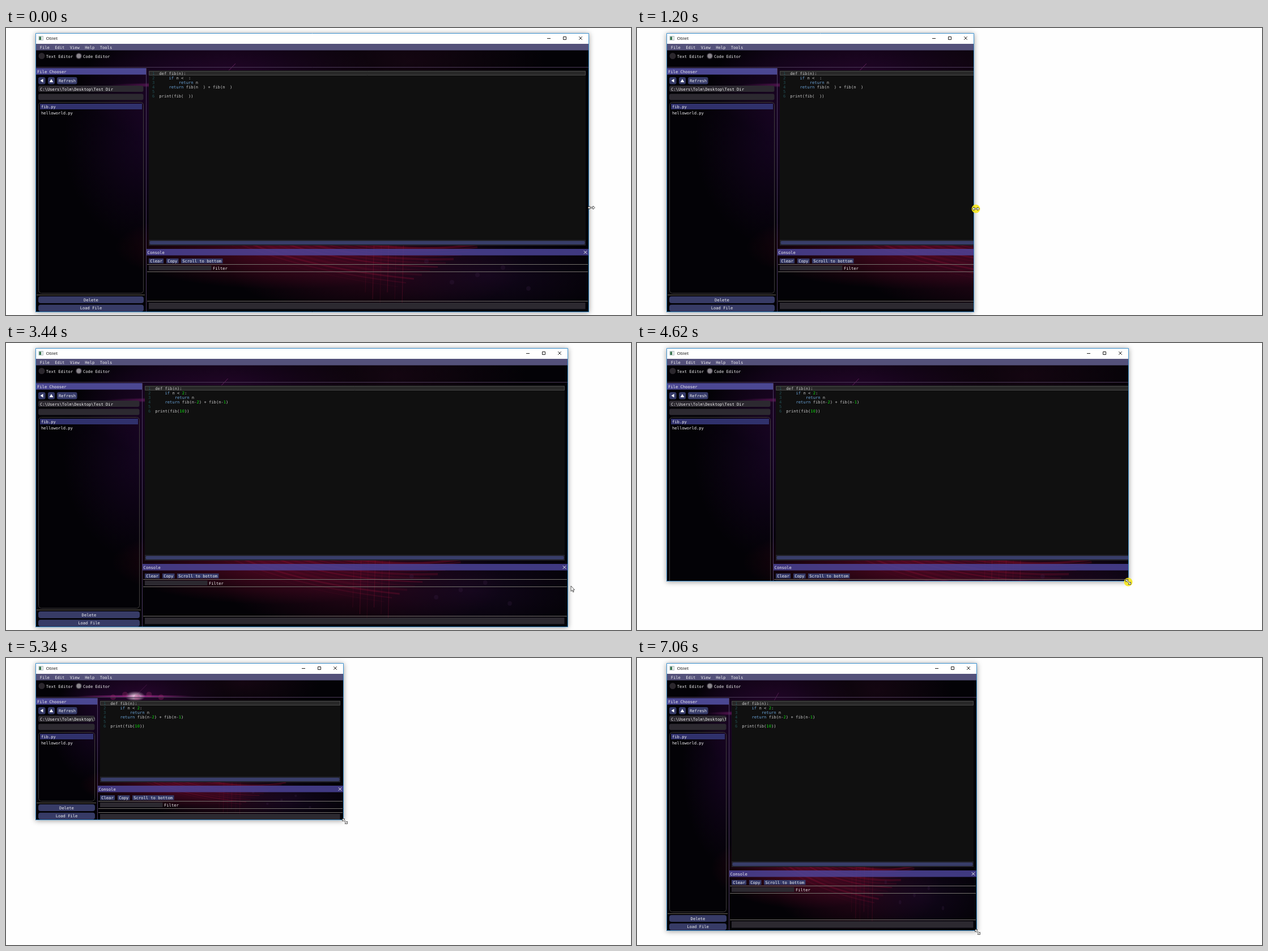
An HTML page with a canvas that plays this animation: 1103x508 px, repeating every 7.57 s.

```html
<!DOCTYPE html>
<html lang="en">
<head>
<meta charset="utf-8">
<title>Resizing an editor window</title>
<style>
  html, body { margin: 0; width: 100%; height: 100%; overflow: hidden; background: #fefefe; }
  canvas { display: block; width: 100vw; height: 100vh; }
</style>
</head>
<body>
<canvas id="stage" width="1103" height="508"></canvas>
<script>
const ctx = document.getElementById('stage').getContext('2d');
const LOOP = 7570, LEFT = 52, TOP = 9, STEP = 47;
const MONO = '7.15px "DejaVu Sans Mono", monospace';
const BUTTON = '#353a68', FIELD = '#2c2930', RULE = '#74716c';

// time, window right, window bottom, pointer x, pointer y
const poses = [
  [0, 1029, 503, 1033, 318],
  [432, 1029, 503, 1033, 318],
  [1200, 595, 503, 598, 320],
  [1380, 592, 503, 597, 320],
  [1840, 592, 503, 597, 320],
  [2310, 846, 503, 853, 320],
  [2590, 992, 503, 996, 320],
  [3100, 992, 503, 996, 320],
  [3440, 992, 503, 997, 430],
  [3860, 992, 503, 993, 503],
  [4183, 992, 503, 993, 503],
  [4620, 868, 422, 867, 423],
  [4970, 682, 328, 683, 330],
  [5250, 596, 287, 598, 289],
  [5940, 596, 287, 598, 289],
  [6740, 597, 470, 599, 472],
  [6880, 600, 483, 601, 485],
  [LOOP, 600, 483, 601, 485]
];

// time from which the content is laid out for this right and bottom edge
const layouts = [[0, 1029, 503], [1310, 592, 503], [2730, 992, 503], [5300, 596, 287], [7020, 600, 483]];
const presses = [[340, 1290], [1890, 2730], [4230, 5300], [5990, 7020]];

function poseAt(t) {
  const i = poses.findIndex(p => p[0] > t), a = poses[i - 1], b = poses[i];
  const steps = Math.max(1, Math.round((b[0] - a[0]) / STEP));
  const k = Math.floor((t - a[0]) / (b[0] - a[0]) * steps + 1e-6) / steps;
  return a.map((v, n) => v + (b[n] - v) * k).slice(1);
}

function box(x, y, right, bottom, fill, radius = 0) {
  ctx.fillStyle = fill;
  ctx.beginPath();
  ctx.roundRect(x, y, right - x, bottom - y, radius);
  ctx.fill();
}

function outline(x, y, right, bottom, color, radius = 0) {
  ctx.strokeStyle = color;
  ctx.lineWidth = 1;
  ctx.beginPath();
  ctx.roundRect(x, y, right - x, bottom - y, radius);
  ctx.stroke();
}

function poly(points, color, width = 1) {
  ctx.strokeStyle = color;
  ctx.lineWidth = width;
  ctx.beginPath();
  points.forEach(p => ctx.lineTo(...p));
  ctx.stroke();
}

function disc(x, y, r, fill) {
  ctx.fillStyle = fill;
  ctx.beginPath();
  ctx.arc(x, y, r, 0, 7);
  ctx.fill();
}

function text(s, x, middle, color = '#f0f0f0', align = 'left') {
  ctx.font = MONO;
  ctx.fillStyle = color;
  ctx.textAlign = align;
  ctx.fillText(s, x, middle + 2.5);
}

function cross(x, y, r, color) {
  poly([[x - r, y - r], [x + r, y + r]], color);
  poly([[x - r, y + r], [x + r, y - r]], color);
}

function clipped(x, y, right, bottom, draw) {
  ctx.save();
  ctx.beginPath();
  ctx.rect(x, y, right - x, bottom - y);
  ctx.clip();
  draw();
  ctx.restore();
}

function glow(x, y, rx, ry, rgb, alpha) {
  ctx.save();
  ctx.translate(x, y);
  ctx.scale(rx, ry);
  const g = ctx.createRadialGradient(0, 0, 0, 0, 0, 1);
  g.addColorStop(0, `rgba(${rgb},${alpha})`);
  g.addColorStop(1, `rgba(${rgb},0)`);
  ctx.fillStyle = g;
  ctx.fillRect(-1, -1, 2, 2);
  ctx.restore();
}

// Wallpaper, painted on 977 x 475 units and stretched with the layout
function wallpaper(right, bottom) {
  ctx.save();
  ctx.translate(LEFT, 28);
  ctx.scale((right - LEFT) / 977, (bottom - 28) / 475);
  ctx.fillStyle = '#030206';
  ctx.fillRect(0, 0, 977, 475);
  glow(340, 70, 260, 120, '75,10,85', 0.5);
  glow(200, 170, 150, 190, '38,6,58', 0.5);
  glow(660, 30, 240, 100, '40,10,30', 0.45);
  glow(440, 360, 300, 75, '120,10,45', 0.65);
  glow(600, 395, 260, 90, '85,10,45', 0.5);
  glow(800, 410, 230, 80, '30,10,45', 0.55);
  for (let i = 0; i < 12; i++) {
    ctx.strokeStyle = `rgba(${150 + i * 6},20,60,${0.1 + (i % 3) * 0.07})`;
    ctx.lineWidth = 1 + i % 4;
    ctx.beginPath();
    ctx.moveTo(300 + i * 18, 335);
    ctx.quadraticCurveTo(420 + i * 20, 400 - i * 2, 640 + i * 14, 430 - i * 7);
    ctx.stroke();
  }
  for (let i = 0; i < 6; i++)
    poly([[585 + i * 13, 330], [582 + i * 13, 440 + i % 3 * 12]], `rgba(190,30,70,${0.12 + i % 2 * 0.12})`);
  poly([[316, 73], [353, 35]], 'rgba(180,70,160,.45)');
  glow(316, 73, 190, 5, '225,60,190', 0.7);
  glow(316, 73, 32, 17, '255,225,245', 0.95);
  for (let i = 0; i < 5; i++)
    disc(246 + i * 38, 76 - i % 2 * 9, 9, 'rgba(160,40,110,.32)');
  for (let i = 0; i < 5; i++)
    disc(690 + i * 45, 385 + i * 37 % 50, 4, 'rgba(70,40,80,.22)');
  ctx.restore();
}

const code = ['def fib(n):', '    if n < 2:', '        return n', '    return fib(n-2) + fib(n-1)', '', 'print(fib(10))'];

function codeLine(line, x, y, digits) {
  const advance = 7.15 * 0.602;
  for (const { 0: word, index } of line.matchAll(/\w+|[^\w\s]+/g)) {
    const number = /^\d/.test(word);
    if (!digits && (number || word === '-')) continue;
    const color = number ? '#10e010' : /^(if|return)$/.test(word) ? '#6ba4d8' : '#c8c8c8';
    text(word, x + index * advance, y, color);
  }
}

function header(right) {
  box(LEFT, 28, right, 39.5, '#54517a');
  ['File', 'Edit', 'View', 'Help', 'Tools'].forEach((s, i) => text(s, 59.7 + i * 26.5, 34));
  disc(63, 49.5, 5.5, '#2b272d');
  disc(128.5, 49.5, 5.5, '#343038');
  disc(128.5, 49.5, 4, '#8b878d');
  text('Text Editor', 70.8, 50);
  text('Code Editor', 136, 50);
  poly([[LEFT, 69.5], [right, 69.5]], '#4a3856');
}

function sidebar(side, bottom) {
  box(LEFT, 71, side, 82.5, '#4b4792');
  text('File Chooser', 55, 77);
  box(57, 87, 69.5, 99.5, BUTTON, 3);
  box(74, 87, 86, 99.5, BUTTON, 3);
  box(90, 87, 125.5, 99.5, BUTTON, 3);
  ctx.fillStyle = '#fff';
  ctx.fill(new Path2D('M60.5 93.3l5-3.2v6.4zM80 90.3l3.4 5.7h-6.8z'));
  text('Refresh', 93, 93.5);
  box(57, 102, side - 4.5, 113, FIELD, 3);
  box(57, 116.5, side - 4.5, 127.5, FIELD, 3);
  clipped(57, 102, side - 4.5, 113, () => text(String.raw`C:\Users\Tolm\Desktop\Test Dir`, 60, 108));
  outline(57.5, 131.5, side - 4.5, bottom - 33.5, '#403d3c', 5);
  box(60, 134, side - 7, 144, '#30316c');
  text('fib.py', 62, 139.3);
  text('helloworld.py', 62, 150);
  poly([[54, bottom - 30.5], [side - 2, bottom - 30.5]], '#686254');
  ['Delete', 'Load File'].forEach((s, i) => {
    const y = bottom - 28 + i * 14.7;
    box(57, y, side - 4, y + 12, '#373b66', 4);
    text(s, (57 + side - 4) / 2, y + 6, '#f0f0f0', 'center');
  });
  poly([[side + 0.5, 71], [side + 0.5, bottom]], '#4b3a60');
}

function editor(side, right, end, digits) {
  const x = side + 5;
  box(x, 75, right - 6, end, '#101010');
  box(x, 76, right - 6, 83.5, '#282828');
  outline(x + 0.5, 76.5, right - 6.5, 83.5, '#484848');
  code.forEach((line, i) => {
    text(String(i + 1), side + 11, 80.3 + i * 8, '#245056');
    codeLine(line, side + 23.3, 80.3 + i * 8, digits);
  });
  box(x, end - 10, right - 6, end, '#22222b');
  box(x + 1.5, end - 8, right - 7.5, end - 2, '#383d69', 2);
}

function consolePane(side, right, top, bottom) {
  const rule = y => poly([[side + 2, y], [right - 2, y]], RULE);
  box(side + 1, top, right, top + 11.5, 'rgba(78,70,158,.8)');
  text('Console', side + 2.6, top + 6);
  cross(right - 6.5, top + 6, 2.7, '#f0f0f0');
  [['Clear', 5, 31], ['Copy', 36, 57.5], ['Scroll to bottom', 62, 135.5]].forEach(([s, a, b]) => {
    box(side + a, top + 17, side + b, top + 25.5, BUTTON);
    text(s, side + a + 2.2, top + 21.2);
  });
  rule(top + 27.5);
  box(side + 5, top + 29.5, side + 115.5, top + 38, FIELD);
  text('Filter', side + 118, top + 34);
  rule(top + 40.5);
  const last = Math.max(bottom - 19.5, top + 47.5);
  rule(last);
  box(side + 5, last + 2.5, right - 6.5, last + 14, FIELD);
}

function content(right, bottom, digits) {
  const side = Math.round(LEFT + 0.2 * (right - LEFT));
  const top = Math.round(bottom * 0.764 + 6.8);
  clipped(LEFT, 28, right, bottom, () => {
    wallpaper(right, bottom);
    header(right);
    sidebar(side, bottom);
    editor(side, right, top - 6, digits);
    consolePane(side, right, top, bottom);
    poly([[right - 0.5, 28], [right - 0.5, bottom]], '#4b3a60');
  });
}

function frame(right, bottom) {
  ctx.save();
  ctx.shadowColor = 'rgba(0,0,0,.4)';
  ctx.shadowBlur = 9;
  ctx.shadowOffsetY = 1;
  box(LEFT, TOP, right, bottom, '#000');
  ctx.restore();
  box(LEFT, TOP, right, 28, '#fff');
}

function titleBar(right) {
  box(57.5, 14, 66, 22, '#b8c5c8');
  box(58.5, 15.5, 62, 21, '#39764f');
  box(62, 15.5, 65, 21, '#e8ecec');
  ctx.font = '8px "Open Sans", sans-serif';
  ctx.fillStyle = '#111';
  ctx.textAlign = 'left';
  ctx.fillText('Oblet', 70.5, 21);
  poly([[right - 74, 18.5], [right - 68, 18.5]], '#222');
  outline(right - 45.5, 15.5, right - 40.5, 20.5, '#222');
  cross(right - 15, 18, 2.8, '#222');
}

function pointer(x, y, t) {
  if (presses.some(([a, b]) => t >= a && t < b)) disc(x, y, 7.5, 'rgba(246,232,25,.9)');
  const arrow = t >= 3150 && t < 3800;
  ctx.save();
  ctx.translate(x, y);
  if (t >= 3800) ctx.rotate(Math.PI / 4);
  const shape = new Path2D(arrow
    ? 'M0 0V9.5L2.2 7.5L3.8 11L5.2 10.4L3.7 7H6.6Z'
    : 'M-6.3 0L-3 -3V-.9H3V-3L6.3 0L3 3V.9H-3V3Z');
  ctx.fillStyle = '#fff';
  ctx.fill(shape);
  ctx.strokeStyle = '#222';
  ctx.lineWidth = 0.75;
  ctx.stroke(shape);
  ctx.restore();
}

function render(t) {
  const [right, bottom, x, y] = poseAt(t);
  const index = layouts.findLastIndex(l => l[0] <= t);
  const [, w, h] = layouts[index];
  ctx.fillStyle = '#fefefe';
  ctx.fillRect(0, 0, 1103, 508);
  frame(right, bottom);
  clipped(LEFT, 28, right, bottom, () => {
    // a sliver of the wide layout stays visible beside the narrow one
    if (index === 1) clipped(590, 28, 597, bottom, () => content(1029, 503, false));
    content(w, h, index > 0);
  });
  titleBar(right);
  outline(LEFT + 0.5, TOP + 0.5, right - 0.5, bottom - 0.5, '#3c91cf');
  pointer(x, y, t);
}

function tick() {
  render(performance.now() % LOOP);
  requestAnimationFrame(tick);
}
tick();
</script>
</body>
</html>
```
